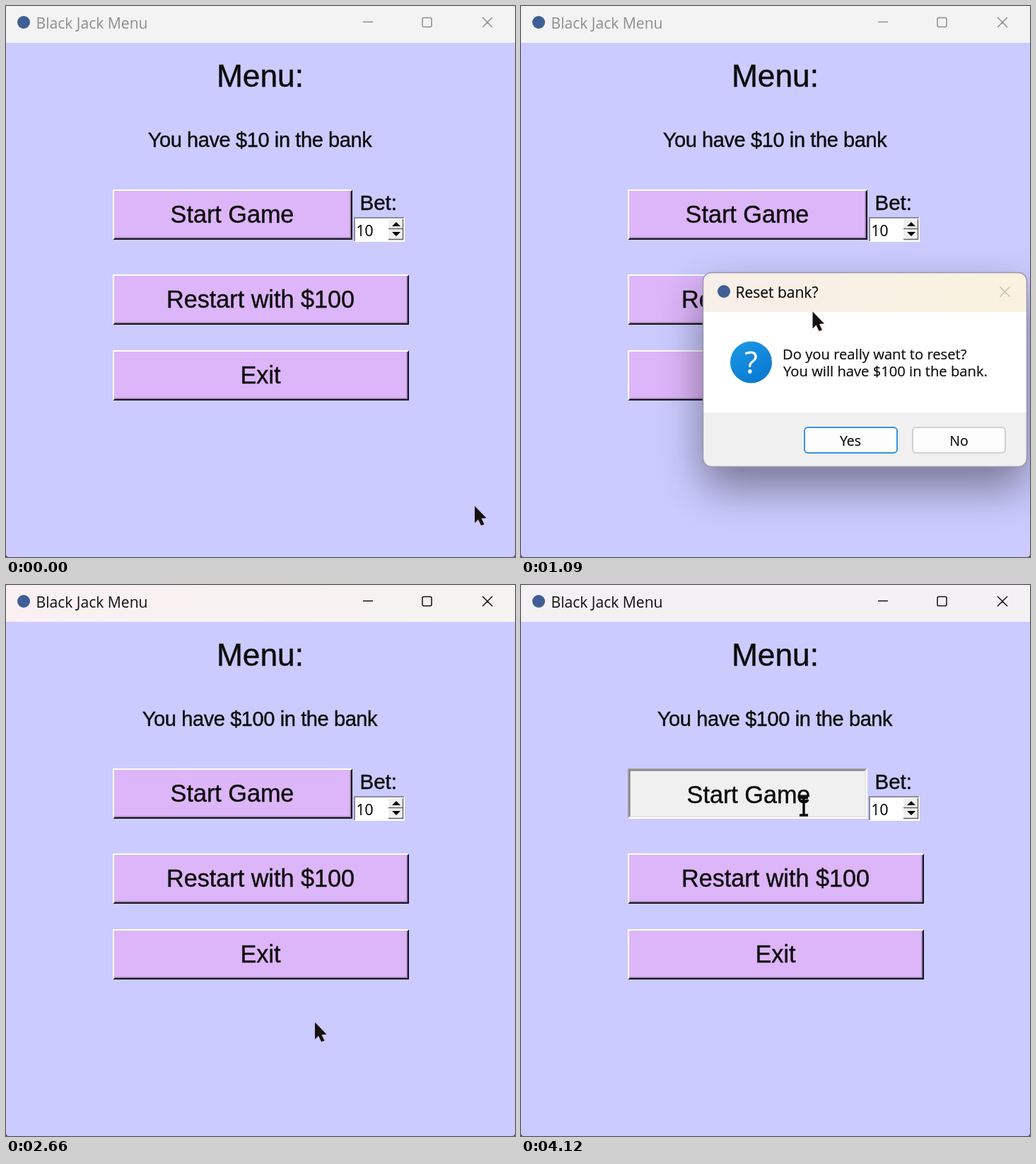
Animation of 720 by 778 pixels, one loop 4.2 s. Source, as an HTML page:

```html
<!DOCTYPE html>
<html lang="en">
<head>
<meta charset="utf-8">
<title>Black Jack Menu</title>
<style>
  html, body { margin: 0; width: 100%; height: 100%; overflow: hidden; background: #cbcbff; }
  svg { display: block; width: 720px; height: 778px; }
  text { font-family: "Liberation Sans", Arial, sans-serif; fill: #0c0c0c; stroke: #0c0c0c; stroke-width: .4; white-space: pre; }
  .mid { text-anchor: middle; }
  .ui { font-family: "Open Sans", "Noto Sans", sans-serif; stroke-width: .2; }
  .label { font-size: 34.2px; text-anchor: middle; }
  #title { stroke: none; }
  #bank { letter-spacing: -.4px; }
  #base { filter: drop-shadow(0 28px 31px rgba(0, 0, 0, .43)); }
  #dialog { transform-origin: 385px 468px; }
</style>
</head>
<body>
<svg viewBox="0 0 720 778">
  <defs>
    <linearGradient id="warm"><stop stop-color="#faf0f3"/><stop offset="1" stop-color="#f5f3f0"/></linearGradient>
    <linearGradient id="cream"><stop stop-color="#f7efe9"/><stop offset="1" stop-color="#faf2de"/></linearGradient>
    <linearGradient id="blue" x2=".6" y2="1"><stop stop-color="#1b9ae4"/><stop offset="1" stop-color="#0b7ad3"/></linearGradient>
  </defs>
  <rect width="720" height="778" fill="#cbcbff"/>
  <path d="M0 774v4h4q-4 0-4-4M720 774v4h-4q4 0 4-4" fill="#333"/>

  <rect id="bar" width="720" height="52"/>
  <circle cx="25" cy="23" r="9" fill="#3f5f94"/>
  <text id="title" class="ui" x="42.5" y="32" font-size="21.1">Black Jack Menu</text>
  <path id="controls" d="M505 22.5h14M591 16.5h9q2 0 2 2v9q0 2-2 2h-9q-2 0-2-2v-9q0-2 2-2M674 16l14 14M688 16l-14 14" fill="none" stroke-width="1.5"/>

  <text class="mid" x="359.5" y="114" font-size="44.3">Menu:</text>
  <text id="bank" class="mid" x="359" y="199" font-size="29"></text>
  <g id="buttons"></g>

  <text x="500.5" y="288" font-size="29.5">Bet:</text>
  <rect x="492" y="298" width="72" height="35" fill="#fff"/>
  <path d="M493 332V299H563" fill="none" stroke="#8d8d9c" stroke-width="2"/>
  <rect x="541" y="301" width="21" height="30" fill="#f0f0f0"/>
  <path d="M541 314.5h21M541 329.5h21M561.5 301v29" stroke="#666" stroke-width="1.5"/>
  <path d="M546 311l6-6 6 6zM546 319h12l-6 6z" fill="#000"/>
  <text class="ui" x="495.5" y="325" font-size="21">10</text>

  <g id="dialog">
    <rect id="base" x="257.5" y="376.5" width="458" height="274" rx="12" fill="#f0f0f0"/>
    <path id="head" d="M258 432V389q0-12 12-12H703q12 0 12 12V432z"/>
    <path d="M258 432H715V574H258z" fill="#fff"/>
    <rect x="257.5" y="376.5" width="458" height="274" rx="12" fill="none" stroke="#9896ad" stroke-width="1.5"/>
    <circle cx="287" cy="403" r="9" fill="#3f5f94"/>
    <text class="ui" x="303.5" y="412" font-size="21">Reset bank?</text>
    <path id="close" d="M677.5 396.5l14 14M691.5 396.5l-14 14" stroke-width="1.5"/>
    <circle cx="325.5" cy="503" r="29.5" fill="url(#blue)"/>
    <text class="ui mid" x="325.5" y="519" font-size="43" style="fill:#fff;stroke:#fff">?</text>
    <g font-size="20.2">
      <text class="ui" x="370" y="499">Do you really want to reset?</text>
      <text class="ui" x="371" y="523">You will have $100 in the bank.</text>
    </g>
    <rect id="yes" x="401" y="595" width="131" height="36" rx="5" stroke="#3a93dc" stroke-width="2"/>
    <rect x="554" y="595" width="131" height="36" rx="5" fill="#fdfdfd" stroke="#d0d0d0" stroke-width="2"/>
    <g font-size="19.5">
      <text class="ui mid" x="466" y="621">Yes</text>
      <text class="ui mid" x="619.5" y="621">No</text>
    </g>
  </g>

  <path id="arrow" d="M0 0V24L5 19 9 27.5 13.5 26 9.5 17.5 16.5 17z" fill="#17120e"/>
  <path id="beam" d="M394 300.5h12M395 305h10M394 325h12M400 299v27" stroke="#0c0c0c" stroke-width="3.5"/>
  <circle id="glow" r="21.5" fill="#ff0" opacity=".57"/>
</svg>
<script>
const LOOP = 4200;
const el = id => document.getElementById(id);
const set = (id, attrs) => {
  for (const name in attrs) el(id).setAttribute(name, attrs[name]);
};
const show = (id, on) => set(id, { visibility: on ? "visible" : "hidden" });
const within = (t, from, to) => t >= from && t < to;

// Progress 0..1 advancing in n equal jumps, as the screen recorder saw it.
const steps = (t, start, dt, n) => Math.max(0, Math.min(1, Math.floor((t - start + 1) / dt) / n));
const smooth = p => p * p * (3 - 2 * p);

function button(x, y, w, h, label, down) {
  const edge = (inset, corner, color) => {
    const l = x + inset, t = y + inset, r = x + w - inset, b = y + h - inset;
    const path = corner ? `M${l} ${b}V${t}H${r}` : `M${l} ${b}H${r}V${t}`;
    return `<path d="${path}" fill="none" stroke="${color}" stroke-width="2"/>`;
  };
  const shift = down ? 2 : 0;
  const edges = down
    ? edge(2.5, 1, "#777") + edge(1, 1, "#a0a0a0") + edge(2.5, 0, "#e3e3e3") + edge(1, 0, "#fff")
    : edge(2.5, 0, "#9a7eae") + edge(1, 0, "#17131c") + edge(1, 1, "#fff");
  return `<rect x="${x}" y="${y}" width="${w}" height="${h}" fill="${down ? "#f0f0f0" : "#ddb5f9"}"/>${edges}
    <text class="label" x="${x + w / 2 - .5 + shift}" y="${y + 47 + shift}">${label}</text>`;
}

function cursor(t) {
  if (t >= 3860) return [400, 311];
  const stops = [[663, 706], [412.5, 431.5], [437, 617.5], [400, 330]];
  const moves = [[1.5, 8], [1611, 7], [3310, 7]];
  let [x, y] = stops[0];
  moves.forEach(([start, n], i) => {
    const p = smooth(steps(t, start, 68.5, n));
    x += (stops[i + 1][0] - stops[i][0]) * p;
    y += (stops[i + 1][1] - stops[i][1]) * p;
  });
  return [x, y];
}

let lastButtons;
function draw(t) {
  const active = within(t, 620, 830) || t >= 2450;
  const closing = t >= 2450;
  const ink = active ? "#111" : "#8e8e8e";
  el("title").style.fill = ink;
  set("controls", { stroke: ink });
  set("bar", { fill: t >= 3860 ? "#f3f1f3" : closing ? "url(#warm)" : active ? "#f0f0f0" : "#f3f3f3" });
  el("bank").textContent = `You have $${closing ? 100 : 10} in the bank`;

  const buttons = button(151, 259, 339, 71, "Start Game", t >= 3930)
    + button(151, 379, 419, 71, "Restart with $100", within(t, 620, 770))
    + button(151, 486, 419, 71, "Exit", false);
  if (buttons !== lastButtons) el("buttons").innerHTML = lastButtons = buttons;

  const opened = steps(t, 765, 64, 5), closed = steps(t, 2381, 69.5, 4);
  const grown = 1 - (1 - opened) ** 2;
  el("dialog").style.opacity = grown * (1 - closed);
  el("dialog").style.transform = `scale(${.92 + .08 * grown - .054 * closed})`;
  show("dialog", opened > 0 && closed < 1);
  set("head", { fill: closing ? "#eeeef0" : "url(#cream)" });
  set("close", { stroke: closing ? "#333" : "#c4bdb0" });
  set("yes", { fill: t >= 2240 ? "#dbebf8" : t >= 2160 ? "#e0eef9" : t >= 2020 ? "#e9f3fc" : "#fdfdfd" });

  const [x, y] = cursor(t);
  const place = { transform: `translate(${x} ${y})` };
  set("arrow", place);
  set("glow", place);
  show("arrow", t < 4120);
  show("beam", t >= 4120);
  show("glow", within(t, 620, 770) || within(t, 2240, 2380) || within(t, 3930, 4120));
}

const began = performance.now();
function frame() {
  draw((performance.now() - began) % LOOP);
  requestAnimationFrame(frame);
}
frame();
</script>
</body>
</html>
```
